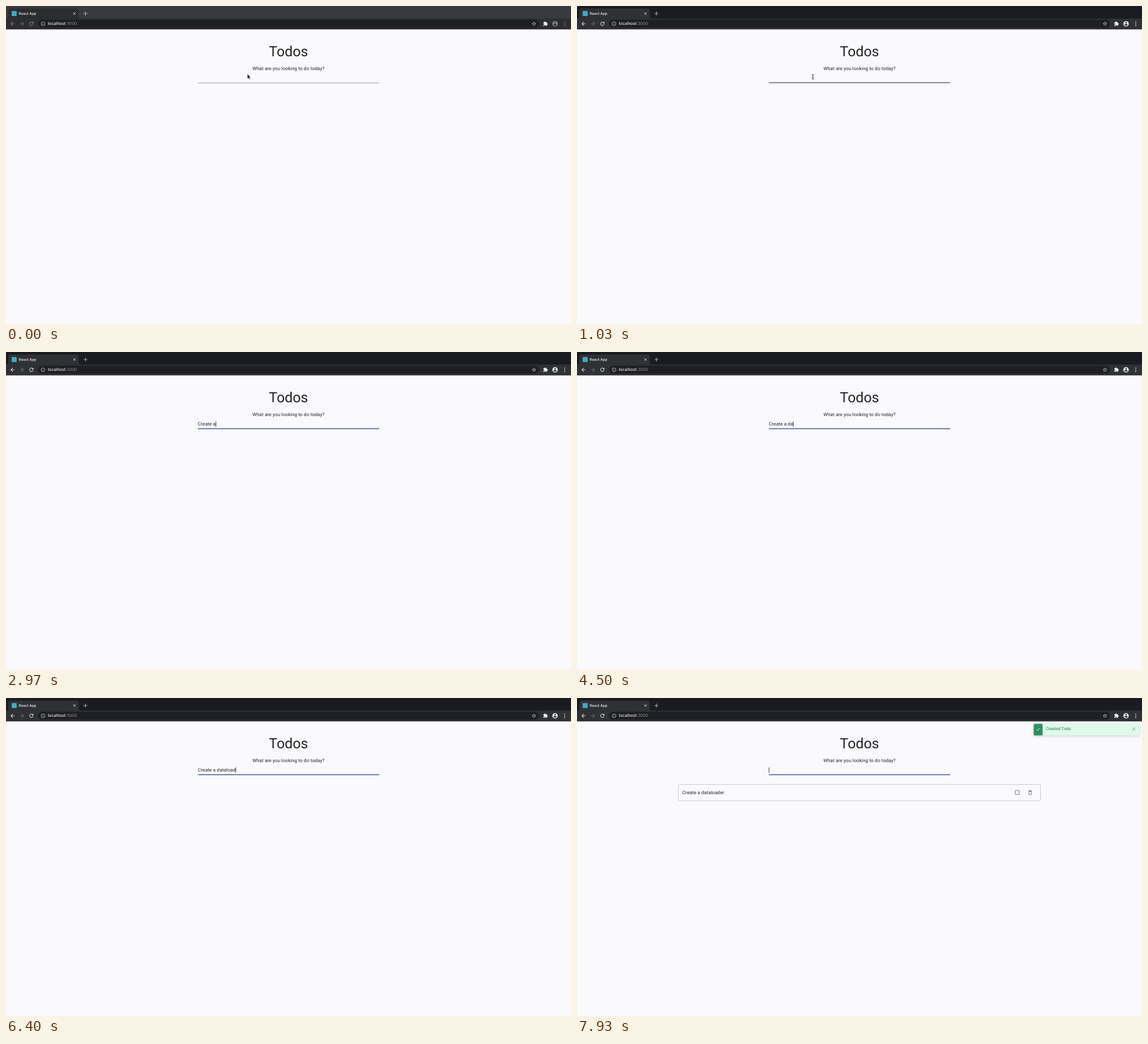
An HTML page for the animation above (8000 ms loop, 900 by 506 pixels).

```html
<!DOCTYPE html>
<html lang="en">
<head>
<meta charset="utf-8">
<title>Todos</title>
<style>
  html, body { margin: 0; width: 100%; height: 100%; overflow: hidden; background: #faf9fc; }
  svg { display: block; width: 100vw; height: 100vh; }
  text { font: 7.5px Roboto, sans-serif; letter-spacing: .0704px; fill: #212123; white-space: pre; text-rendering: geometricPrecision; }
  .ui { font-family: Inter, sans-serif; letter-spacing: 0; fill: #f1f2f4; }
  .middle { text-anchor: middle; }
  #toast { filter: drop-shadow(0 1.4px 1.9px rgba(0, 0, 0, .175)); }
  .dim { --bar: #2c2d31; --strip: #393a3f; --icon: #8d8e92; }
  .lit { --bar: #303135; --strip: #1b1c21; --icon: #f1f2f4; }
</style>
</head>
<body>
<svg id="stage" class="dim" viewBox="0 0 900 506" preserveAspectRatio="none">
  <rect width="900" height="506" fill="#faf9fc"/>

  <!-- browser window -->
  <rect width="900" height="21" fill="var(--strip)"/>
  <path d="M0 20Q3.7 20 3.7 16.500V8Q3.700 4 7.700 4H112Q116 4 116 8V16.500Q116 20 119.500 20H900V37.300H0Z" fill="var(--bar)"/>
  <rect x="9" y="8" width="8" height="8" rx="1" fill="#3fa9c1"/>
  <text class="ui" x="20.300" y="13.800" style="font-size:5.700px;font-weight:500">React App</text>
  <path d="M107.200 10.200l3.600 3.600m0-3.600l-3.600 3.600" stroke="#e3e4e6" stroke-width=".8"/>
  <path d="M123.400 12h6.200m-3.100-3.100v6.200" stroke="#c5c6c9" stroke-width=".8"/>
  <rect x="51" y="21.800" width="798" height="12.800" rx="6.400" fill="#1e1f23"/>
  <text class="ui" x="66.700" y="30.400" style="font-size:6.500px"><tspan font-weight="500">localhost</tspan><tspan fill="#8f9094">:3000</tspan></text>
  <g id="icons"></g>
  <g fill="var(--icon)"><circle cx="890" cy="25.500" r=".8"/><circle cx="890" cy="28.200" r=".8"/><circle cx="890" cy="30.900" r=".8"/></g>

  <!-- page -->
  <text class="middle" x="450" y="80.300" style="font-size:22.500px;letter-spacing:0">Todos</text>
  <text class="middle" x="450" y="101.800">What are you looking to do today?</text>
  <text id="field" x="305.600" y="117.300"></text>
  <rect id="caret" y="110.300" width=".8" height="8.700" fill="#212123"/>
  <rect id="line" x="305.600" width="288.800"/>
  <rect id="focus" y="121.400" height="1.100" fill="#3f51b5"/>

  <g id="row">
    <rect x="161.500" y="137.500" width="577" height="26" rx="1.900" fill="none" stroke="#c9c8cc" stroke-width=".9"/>
    <text x="167.800" y="153.400">Create a dataloader</text>
    <rect x="698" y="147.200" width="6.400" height="6.400" rx=".5" fill="none" stroke="#706f72" stroke-width=".9"/>
    <path transform="translate(717.100 145.800) scale(.39)" fill="#706f72" d="M6 19c0 1.100.9 2 2 2h8c1.100 0 2-.9 2-2V7H6v12zM8 9h8v10H8V9zm7.500-5l-1-1h-5l-1 1H5v2h14V4h-3.500z"/>
  </g>

  <g id="toast">
    <rect x="727.500" y="40.900" width="168.700" height="18.700" rx="1.900" fill="#dffaea"/>
    <path d="M741.600 40.900H729.400Q727.500 40.900 727.500 42.800V57.700Q727.500 59.600 729.400 59.600H741.600Z" fill="#2fa06c"/>
    <rect id="countdown" x="727.500" width="14.100" fill="#000" opacity=".1"/>
    <path d="M732 49.700l1.800 1.800 3.600-3.700" fill="none" stroke="#fff" stroke-width=".9"/>
    <text x="747" y="51.400" style="font-size:6.560px;fill:#17734d">Created Todo</text>
    <path d="M884.600 47l4.600 4.600m0-4.600l-4.600 4.600" stroke="#63967f" stroke-width=".8"/>
  </g>

  <path id="arrow" d="M0 0V7.400L1.700 5.900 2.800 8.400 4.100 7.800 3 5.400H5.300Z" fill="#000" stroke="#fff" stroke-width=".5"/>
  <path id="beam" d="M-1.700-3.800Q0-3.800 0-2.600Q0-3.800 1.700-3.800M0-2.600V2.600M-1.700 3.800Q0 3.800 0 2.600Q0 3.800 1.700 3.800M-.9 1H.9" fill="none" stroke="#222" stroke-width=".8"/>
</svg>
<script>
const LOOP = 8000;
const ACTIVATE = 200, HOVER = 950, FOCUS = 1260, SUBMIT = 6900, CREATED = 7150, TOAST = 7165;

// centre x, scale, colour, path on a 24 unit grid
const icons = [
  [10.5, .4, "var(--icon)", "M20 11H7.830l5.590-5.590L12 4l-8 8 8 8 1.410-1.410L7.830 13H20v-2z"],
  [25.3, -.4, "#77787c", "M20 11H7.830l5.590-5.590L12 4l-8 8 8 8 1.410-1.410L7.830 13H20v-2z"],
  [40.4, .4, "var(--icon)", "M17.650 6.350C16.200 4.900 14.210 4 12 4c-4.420 0-8 3.580-8 8s3.580 8 8 8c3.730 0 6.840-2.550 7.730-6h-2.080c-.82 2.330-3.040 4-5.650 4-3.310 0-6-2.690-6-6s2.690-6 6-6c1.660 0 3.140.69 4.220 1.780L13 11h7V4z"],
  [59, .33, "#d5d6d9", "M11 17h2v-6h-2zM12 2a10 10 0 1 0 0 20a10 10 0 1 0 0-20zm0 18a8 8 0 1 1 0-16a8 8 0 1 1 0 16zM11 9h2V7h-2z"],
  [841, .35, "#d5d6d9", "M22 9.240l-7.190-.62L12 2 9.190 8.630 2 9.240l5.460 4.730L5.820 21 12 17.270 18.180 21l-1.630-7.030zM12 15.400l-3.760 2.270 1-4.280-3.320-2.880 4.380-.38L12 6.100l1.710 4.040 4.380.38-3.320 2.880 1 4.280z"],
  [859.3, .34, "#f1f2f4", "M20.500 11H19V7c0-1.100-.9-2-2-2h-4V3.500a2.500 2.500 0 0 0-5 0V5H4c-1.100 0-2 .9-2 2v3.800h1.500a2.700 2.700 0 0 1 0 5.400H2V20c0 1.100.9 2 2 2h3.800v-1.500a2.700 2.700 0 0 1 5.400 0V22H17c1.100 0 2-.9 2-2v-4h1.500a2.500 2.500 0 0 0 0-5z"],
  [874.6, .43, "var(--icon)", "M12 2a10 10 0 1 0 0 20a10 10 0 1 0 0-20zm0 3a3 3 0 1 1 0 6a3 3 0 1 1 0-6zm0 14.200c-2.500 0-4.710-1.280-6-3.220.03-1.990 4-3.080 6-3.080 1.990 0 5.970 1.090 6 3.080-1.290 1.940-3.500 3.220-6 3.220z"]
];

// time of each key; "<" deletes one character
const keys = [
  [2030, "C"], [2130, "r"], [2270, "e"], [2400, "a"], [2500, "t"], [2670, "e"], [2770, " "],
  [2930, "a"], [3000, " "], [3930, "d"], [4200, "e"], [5370, "<"], [5500, "a"], [5670, "t"],
  [5830, "a"], [6100, "l"], [6200, "o"], [6230, "a"], [6400, "d"], [6530, "e"], [6670, "r"]
];

// pointer path: time, x, y
const track = [[0, 384.6, 108.3], [400, 382.5, 110.5], [700, 382.5, 110.5], [HOVER, 377, 112.3], [1200, 373, 113.5]];

const $ = id => document.getElementById(id);
const set = (id, attrs) => { for (const k in attrs) $(id).setAttribute(k, attrs[k]); };
const show = (id, on) => set(id, { visibility: on ? "visible" : "hidden" });
const ramp = (t, from, length) => Math.min(1, Math.max(0, (t - from) / length));

function bezier(x1, y1, x2, y2) {
  const at = (a, b, s) => 3 * a * s * (1 - s) ** 2 + 3 * b * s * s * (1 - s) + s ** 3;
  return x => {
    let lo = 0, hi = 1;
    for (let i = 0; i < 24; i++) {
      const mid = (lo + hi) / 2;
      if (at(x1, x2, mid) < x) lo = mid; else hi = mid;
    }
    return at(y1, y2, hi);
  };
}
const easeOut = bezier(0, 0, .2, 1);
const slide = bezier(.2, 0, 0, 1);

function pointer(t) {
  let [, x, y] = track[0];
  for (let i = 1; i < track.length; i++) {
    const [from, x0, y0] = track[i - 1], [to, x1, y1] = track[i];
    if (t >= from) {
      const p = ramp(t, from, to - from);
      x = x0 + (x1 - x0) * p;
      y = y0 + (y1 - y0) * p;
    }
  }
  return `translate(${x} ${y})`;
}

function drawField(t) {
  let value = "", touched = FOCUS;
  for (const [time, key] of keys) {
    if (time > t) break;
    value = key === "<" ? value.slice(0, -1) : value + key;
    touched = time;
  }
  if (t >= SUBMIT) {
    value = "";
    touched = SUBMIT;
  }
  $("field").textContent = value;
  const width = value ? $("field").getComputedTextLength() : 0;
  set("caret", { x: 305.5 + width });
  show("caret", t >= FOCUS && (t - touched) % 1000 < 500);

  const hover = t >= HOVER && t < FOCUS + 200;
  set("line", hover
    ? { y: 121.5, height: 1, fill: "#2b2b2d" }
    : { y: 121.8, height: .8, fill: "#8e8e91" });
  const grow = 288.8 * easeOut(ramp(t, FOCUS, 200));
  set("focus", { x: 450 - grow / 2, width: grow });
}

function drawToast(t) {
  show("toast", t >= TOAST);
  const away = 202.5 * (1 - slide(ramp(t, TOAST, 220)));
  set("toast", { transform: `translate(${away} 0)` });
  const left = 18.7 * (1 - ramp(t, TOAST, 5000));
  set("countdown", { y: 59.6 - left, height: left });
}

function draw(t) {
  $("stage").setAttribute("class", t < ACTIVATE ? "dim" : "lit");
  set("arrow", { transform: pointer(t) });
  set("beam", { transform: pointer(t) });
  show("arrow", t < HOVER);
  show("beam", t >= HOVER && t < keys[0][0]);
  show("row", t >= CREATED);
  drawField(t);
  drawToast(t);
}

$("icons").innerHTML = icons.map(([x, s, fill, d]) =>
  `<path transform="translate(${x} 28.2) scale(${s}) translate(-12 -12)" fill="${fill}" fill-rule="evenodd" d="${d}"/>`).join("");

const start = performance.now();
function tick() {
  draw((performance.now() - start) % LOOP);
  requestAnimationFrame(tick);
}
tick();
</script>
</body>
</html>
```
